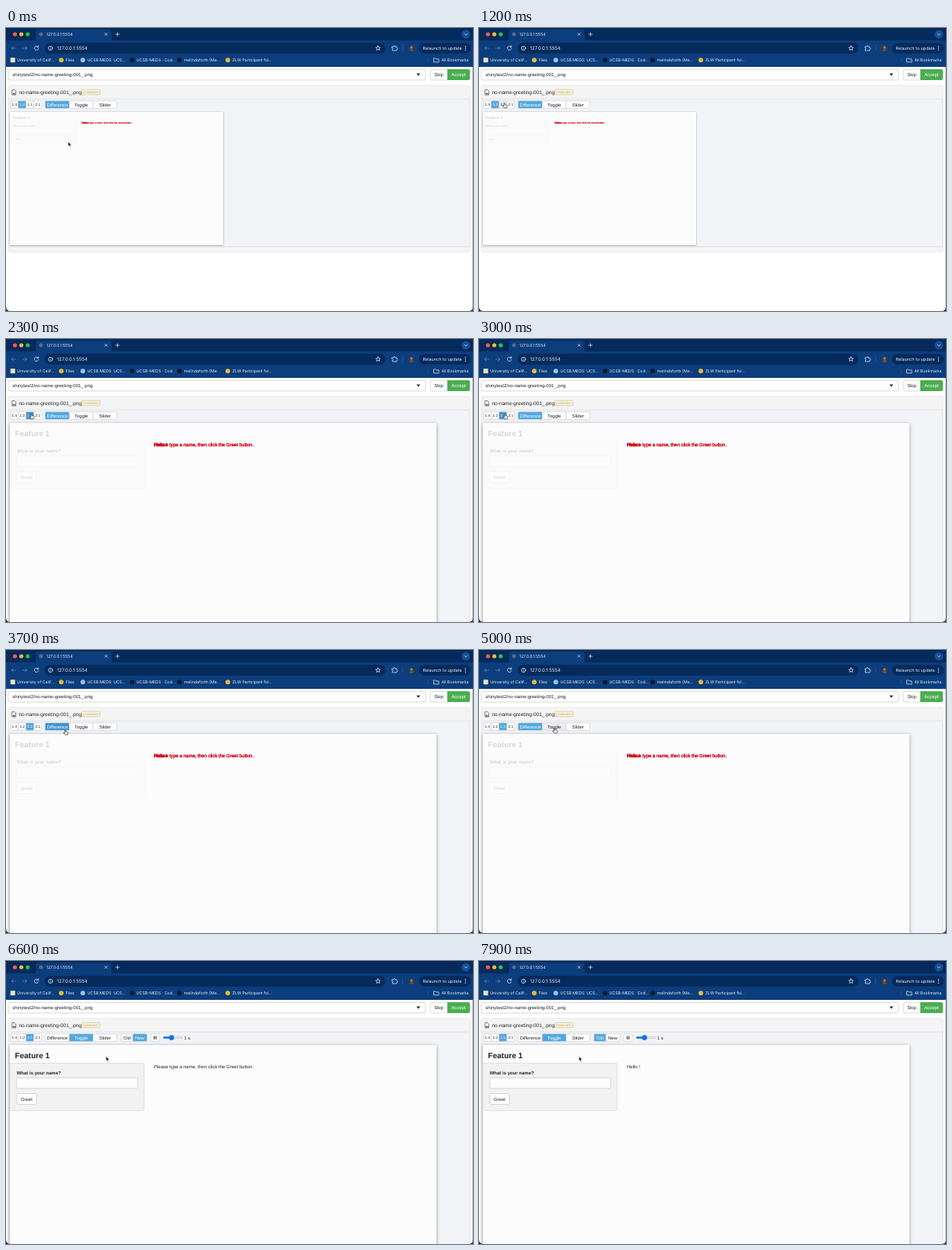
An HTML page for the animation above (8000 ms loop, 600x364 px).

```html
<!DOCTYPE html>
<html lang="en">
<head>
<meta charset="utf-8">
<title>Snapshot review</title>
<style>
html, body { margin: 0; width: 100%; height: 100%; overflow: hidden; background: #fff; }
svg { display: block; width: 600px; height: 364px; }
text { font-family: "Liberation Sans", Arial, sans-serif; font-size: 6px; fill: #222; text-rendering: geometricPrecision; white-space: pre; }
.ui text { font-family: Inter, sans-serif; font-size: 5.2px; fill: #e9f0fa; }
.mid { text-anchor: middle; }
.line { fill: none; stroke: #d6e2f4; stroke-width: .8; stroke-linecap: round; stroke-linejoin: round; }
.btn rect { stroke: #c4c6c9; stroke-width: .6; }
</style>
</head>
<body>
<svg viewBox="0 0 600 364">
  <defs>
    <filter id="shadow" x="-5%" y="-5%" width="110%" height="110%">
      <feDropShadow dx="0" dy="1" stdDeviation="2" flood-color="#000" flood-opacity=".4"/>
    </filter>
    <clipPath id="round"><circle cx="521" cy="26" r="4"/></clipPath>
  </defs>

  <rect width="600" height="364" fill="#fff"/>

  <!-- review page -->
  <rect x="3" y="53.3" width="536" height="13.6" rx="2" fill="#fff" stroke="#c8c8c8" stroke-width=".7"/>
  <text x="8.3" y="62.2">shinytest2/no-name-greeting-001_.png</text>
  <path d="M527.3 58.6h5l-2.5 3z" fill="#222"/>
  <path d="M567.5 53.3H547a2 2 0 0 0-2 2v9.600a2 2 0 0 0 2 2h20.500z" fill="#fff" stroke="#ccc" stroke-width=".7"/>
  <text x="556" y="62.200" class="mid">Skip</text>
  <path d="M567 53h27a2 2 0 0 1 2 2v10a2 2 0 0 1-2 2h-27z" fill="#4cae50"/>
  <text x="581.500" y="62.200" class="mid" style="fill:#fff">Accept</text>

  <rect id="panel" x="3" y="74" width="593" rx="1.500" fill="#f1f3f7" stroke="#d9d9d9" stroke-width=".7"/>
  <rect x="3.400" y="74.400" width="592.200" height="16.600" fill="#f4f4f4"/>
  <path d="M3 91.200H596" stroke="#dcdcdc" stroke-width=".7"/>
  <g id="foot">
    <rect x="3.400" y="281.500" width="592.200" height="6" fill="#f4f4f4"/>
    <path d="M3 281.300H596" stroke="#d9d9d9" stroke-width=".7"/>
  </g>
  <path d="M7.800 79.500h3.200l1.600 1.600v4.900H7.800z" fill="#fff" stroke="#444" stroke-width=".7"/>
  <path d="M8.300 85.200l1.300-2 .9 1 .7-.8 1 1.800z" fill="#444"/>
  <text x="16.500" y="84.700" style="font-size:6.500px">no-name-greeting-001_.png</text>
  <rect x="97.300" y="79.300" width="23.200" height="6.400" rx=".8" fill="#fbf8ec" stroke="#cdb66c" stroke-width=".6"/>
  <text x="108.900" y="84" class="mid" style="font-size:4px;fill:#c09a45">CHANGED</text>

  <g id="buttons" class="btn"></g>
  <g id="timer">
    <rect x="186" y="93.800" width="11" height="9.500" rx="1.500" fill="#fff" stroke="#c4c6c9" stroke-width=".6"/>
    <path d="M190.400 96.400v4.300M192.700 96.400v4.300" stroke="#222" stroke-width="1.100"/>
    <rect x="202" y="97.400" width="25" height="2.300" rx="1.150" fill="#e4e4e4" stroke="#b8b8b8" stroke-width=".4"/>
    <rect x="202" y="97.300" width="11" height="2.500" rx="1.200" fill="#1474e6"/>
    <circle cx="212.600" cy="98.600" r="3.400" fill="#1474e6"/>
    <text x="228.800" y="100.800">1 s</text>
  </g>

  <!-- snapshot -->
  <g id="shot">
    <rect x="5" y="108" width="548" height="342" fill="#fcfcfc" filter="url(#shadow)"/>
    <g id="app">
      <rect x="5" y="131.500" width="172.300" height="61" rx="1.500" fill="#f1f1f1" stroke="#dedede" stroke-width=".8"/>
      <text x="11.600" y="125" style="font-size:10px;font-weight:bold">Feature 1</text>
      <text x="13.700" y="146" style="font-weight:bold">What is your name?</text>
      <rect x="13.800" y="150.300" width="155.300" height="13.600" rx="1.500" fill="#fdfdfd" stroke="#c8c8c8" stroke-width=".7"/>
      <rect x="13.800" y="170.500" width="25.200" height="14" rx="1.500" fill="#fff" stroke="#c8c8c8" stroke-width=".7"/>
      <text x="26.400" y="179.700" class="mid">Greet</text>
    </g>
    <g id="texts">
      <text id="old" x="190" y="137.700">Hello !</text>
      <text id="new" x="190" y="137.700">Please type a name, then click the Greet button.</text>
    </g>
  </g>

  <!-- browser -->
  <g class="ui">
    <rect width="600" height="50" fill="#0b3f7f"/>
    <path d="M0 16H600V50H0z" fill="#0c3d7c"/>
    <rect width="600" height="16" fill="#052a5c"/>
    <path d="M36 16q2.500 0 2.500-2.500V5q0-3 3-3h91q3 0 3 3v8.500q0 2.500 2.500 2.500z" fill="#0c3d7c"/>
    <circle cx="11.500" cy="8" r="2.600" fill="#fb5b52"/>
    <circle cx="19.700" cy="8" r="2.600" fill="#f9bb2d"/>
    <circle cx="27.900" cy="8" r="2.600" fill="#2ac73f"/>
    <circle cx="45" cy="8" r="2.500" fill="#5b6b80"/>
    <text x="51.800" y="9.900">127.0.0.1:5554</text>
    <path class="line" d="M127 6.500l3 3m0-3l-3 3M141 8h4.400m-2.200-2.200v4.400"/>
    <circle cx="590.800" cy="8" r="5.500" fill="#164f98"/>
    <path class="line" d="M589 7.300l1.800 1.700 1.800-1.700"/>

    <path class="line" style="opacity:.4" d="M12.500 26H7.300m2.300-2.400L7.200 26l2.400 2.400M21.500 26h5.200m-2.300-2.400l2.400 2.400-2.400 2.400"/>
    <path class="line" d="M41.400 24.300a2.700 2.700 0 1 0 .4 2.300M41.700 22.800v1.900h-1.900"/>
    <rect x="49.500" y="19" width="438" height="14" rx="7" fill="#052a5c"/>
    <circle class="line" cx="57.200" cy="26" r="2.700"/>
    <path class="line" d="M57.200 25.900v1.300m0-2.600v.1"/>
    <text x="65.600" y="28" style="font-size:6px">127.0.0.1:5554</text>
    <path class="line" d="M478 22.900l.9 2 2.200.2-1.700 1.400.6 2.100-2-1.200-2 1.200.6-2.100-1.700-1.400 2.200-.2z"/>
    <path class="line" d="M496.300 24h2c-.4-1.900 2-1.900 1.700 0h2v1.700c1.500-.2 1.500 2 0 1.800V29h-5.700v-1.600c1.500.1 1.500-1.800 0-1.700z"/>
    <path d="M509.500 22.500v7" stroke="#315d9a" stroke-width=".6"/>
    <g clip-path="url(#round)">
      <rect x="516" y="21" width="10" height="10" fill="#293c4c"/>
      <circle cx="521" cy="25" r="1.700" fill="#a87958"/>
      <ellipse cx="521" cy="30" rx="3.200" ry="3" fill="#6d5038"/>
    </g>
    <rect x="530.500" y="19.300" width="66.500" height="13.500" rx="6.700" fill="#052a5c"/>
    <text x="535.500" y="28" style="font-size:5.500px">Relaunch to update</text>
    <path d="M590.300 23.700v.1m0 2.200v.1m0 2.200v.1" stroke="#e9f0fa" stroke-width="1.300" stroke-linecap="round"/>

    <rect x="5.700" y="38.200" width="6" height="6" fill="#e8e3bf"/>
    <circle cx="71" cy="41.300" r="3" fill="#e4b93a"/>
    <circle cx="98.700" cy="41.300" r="3" fill="#9fbfe0"/>
    <circle cx="162" cy="41.300" r="3" fill="#0b1a30"/>
    <circle cx="223" cy="41.300" r="3" fill="#0b1a30"/>
    <circle cx="285" cy="41.300" r="3" fill="#e4b93a"/>
    <text x="14.200" y="43.200">University of Calif...</text>
    <text x="76.500" y="43.200">Files</text>
    <text x="104.500" y="43.200">UCSB MEDS: UCS...</text>
    <text x="167.500" y="43.200">UCSB-MEDS · Cod...</text>
    <text x="228.700" y="43.200">melindaforth (Me...</text>
    <text x="290.700" y="43.200">ZLW Participant fol...</text>
    <path d="M542.500 38v7" stroke="#315d9a" stroke-width=".6"/>
    <path class="line" d="M549.800 39h2l.8.900h3.400v4h-6.200z"/>
    <text x="559.500" y="43.200">All Bookmarks</text>
  </g>

  <path d="M0 358v6h6q-6 0-6-6zM600 358v6h-6q6 0 6-6z" fill="#222"/>
  <path d="M599.700 50V364" stroke="#777" stroke-width=".6"/>

  <path id="arrow" d="M0 0v5.700l1.300-1.200.9 2.100 1-.4-.9-2.100h1.800z" fill="#000" stroke="#fff" stroke-width=".5"/>
  <path id="hand" d="M-.6 .4q.6-.8 1.200 0v2l2.300.5q.9.300.7 1.200l-.5 2.400h-3.500l-2-2.500q.3-.9 1.200-.2l.6.500z" fill="#fff" stroke="#111" stroke-width=".6"/>
</svg>
<script>
const $ = id => document.getElementById(id);
const NS = "http://www.w3.org/2000/svg";
const LOOP = 8000, ZOOM = 1600, TOGGLE = 5100, SHOW_NEW = 6000, SHOW_OLD = 7000;

// time, x, y of the pointer's hot spot
const path = [
  [400, 80, 146.5], [1150, 32.6, 96.3], [2950, 32.6, 96.3], [3650, 76.2, 102.6],
  [3900, 76.2, 102.6], [4650, 97, 100.4], [5800, 97, 100.4], [6550, 128.5, 122.8]
];

function add(tag, attrs, parent) {
  const el = document.createElementNS(NS, tag);
  for (const k in attrs) el.setAttribute(k, attrs[k]);
  return parent.appendChild(el);
}

const buttons = [];
function group(labels, edges, size) {
  labels.forEach((label, i) => {
    const x = edges[i], w = edges[i + 1] - x;
    const g = add("g", {}, $("buttons"));
    const box = add("rect", { x, y: 93.8, width: w, height: 9.5, rx: 1 }, g);
    const text = add("text", { x: x + w / 2, y: 98.6 + size * .36, class: "mid" }, g);
    text.textContent = label;
    text.style.fontSize = size + "px";
    buttons.push({ label, x, w, g, box, text });
  });
}
group(["1:4", "1:2", "1:1", "2:1"], [6, 15.8, 25.8, 35.8, 45.8], 4.8);
group(["Difference", "Toggle", "Slider"], [50.3, 81.3, 112, 142.5], 5.9);
group(["Old", "New"], [147.8, 163, 181], 5.9);

function pointer(t) {
  let i = 0;
  while (i < path.length - 1 && t >= path[i + 1][0]) i++;
  const a = path[i], b = path[Math.min(i + 1, path.length - 1)];
  const p = a === b ? 0 : Math.max(0, (t - a[0]) / (b[0] - a[0]));
  const e = p * p * (3 - 2 * p);
  return [a[1] + (b[1] - a[1]) * e, a[2] + (b[2] - a[2]) * e];
}

const show = (id, on) => { $(id).style.display = on ? "" : "none"; };

function draw(t) {
  const big = t >= ZOOM, toggle = t >= TOGGLE;
  const isNew = t >= SHOW_NEW && t < SHOW_OLD;
  const [x, y] = pointer(t);
  const over = y > 93 && y < 103.5 && x > 6 && x < 142.5 && !(x > 45.8 && x < 50.3);
  const active = [big ? "1:1" : "1:2", toggle ? "Toggle" : "Difference", isNew ? "New" : "Old"];

  for (const b of buttons) {
    const on = active.includes(b.label);
    const hot = over && x >= b.x && x < b.x + b.w;
    b.box.style.fill = on ? (hot ? "#3b94d0" : "#50a7df") : (hot ? "#ededed" : "#fff");
    b.text.style.fill = on ? "#fff" : "#222";
    if (b.label === "Old" || b.label === "New") b.g.style.display = toggle ? "" : "none";
  }

  show("timer", toggle);
  show("foot", !big);
  $("panel").setAttribute("height", big ? 400 : 214);
  $("shot").setAttribute("transform", big ? "" : "translate(5 108) scale(.5) translate(-5 -108)");
  $("app").setAttribute("opacity", toggle ? 1 : .17);
  show("old", !toggle || !isNew);
  show("new", !toggle || isNew);
  for (const id of ["old", "new"]) {
    const s = $(id).style;
    s.fill = toggle ? "#222" : "#cc0010";
    s.stroke = toggle ? "none" : "#cc0010";
    s.strokeWidth = ".35px";
  }

  show("arrow", !over);
  show("hand", over);
  $(over ? "hand" : "arrow").setAttribute("transform", `translate(${x} ${y})`);
}

const start = performance.now();
function tick() {
  draw((performance.now() - start) % LOOP);
  requestAnimationFrame(tick);
}
draw(0);
requestAnimationFrame(tick);
</script>
</body>
</html>
```
